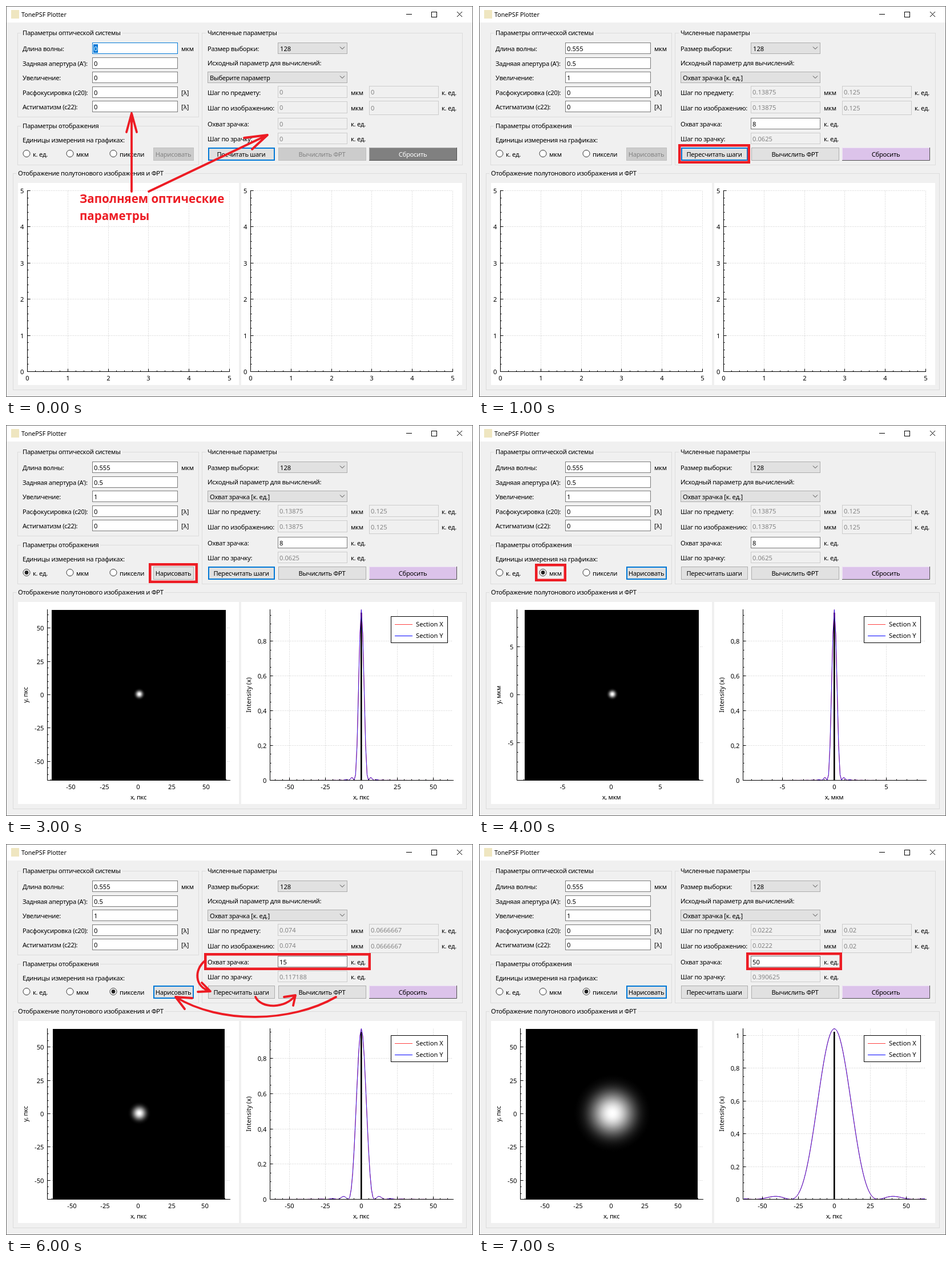
An HTML page with a canvas for the animation above (8000 ms loop, 818 by 685 pixels).

```html
<!DOCTYPE html>
<html lang="ru">
<head>
<meta charset="utf-8">
<title>TonePSF Plotter</title>
<style>
html, body { margin: 0; width: 100%; height: 100%; overflow: hidden; background: #f0f0f0; }
canvas { display: block; }
</style>
</head>
<body>
<canvas id="stage" width="818" height="685"></canvas>
<script>
const ctx = document.getElementById("stage").getContext("2d");
const RED = "#ed1c24", BLUE = "#0078d7", UI = '"Noto Sans", "Open Sans", sans-serif';

function setFont(str, size = 11.2) {
  ctx.font = `${size}px ${UI}`;
  ctx.letterSpacing = /[а-я]/i.test(str) ? "-0.3px" : "0px";
}

function text(str, x, y, { color = "#000", align = "left", size } = {}) {
  setFont(str, size);
  ctx.textAlign = align;
  ctx.textBaseline = "alphabetic";
  ctx.fillStyle = color;
  ctx.fillText(str, x, y + 4);
}

function box(x0, y0, x1, y1, fill, stroke, width = 1) {
  if (fill) {
    ctx.fillStyle = fill;
    ctx.fillRect(x0, y0, x1 - x0 + 1, y1 - y0 + 1);
  }
  if (stroke) {
    ctx.strokeStyle = stroke;
    ctx.lineWidth = width;
    const h = width / 2;
    ctx.strokeRect(x0 + h, y0 + h, x1 - x0 + 1 - width, y1 - y0 + 1 - width);
  }
}

function line(points, color = "#000", width = 1) {
  ctx.strokeStyle = color;
  ctx.lineWidth = width;
  ctx.beginPath();
  points.forEach(([x, y]) => ctx.lineTo(x, y));
  ctx.stroke();
}

function group(title, x0, y0, x1, y1, textX) {
  box(x0, y0, x1, y1, null, "#dcdcdc");
  setFont(title);
  ctx.fillStyle = "#f0f0f0";
  ctx.fillRect(textX - 3, y0 - 1, ctx.measureText(title).width + 6, 3);
  text(title, textX, y0);
}

function field(value, x0, y0, x1, y1, { disabled = false, focus = false } = {}) {
  box(x0, y0, x1, y1, disabled ? "#f0f0f0" : "#fff", disabled ? "#cccccc" : focus ? BLUE : "#7a7a7a");
  const mid = (y0 + y1) / 2 + 1;
  if (focus) box(x0 + 2, y0 + 3, x0 + 9, y1 - 2, BLUE);
  text(value, x0 + 3, mid, { color: disabled ? "#838383" : focus ? "#fff" : "#000" });
}

function combo(value, x0, y0, x1, y1) {
  box(x0, y0, x1, y1, "#e1e1e1", "#adadad");
  text(value, x0 + 4, (y0 + y1) / 2 + 1);
  const x = x1 - 8, y = (y0 + y1) / 2;
  line([[x - 4, y - 2], [x, y + 2], [x + 4, y - 2]], "#444");
}

function button(label, x0, x1, { disabled = false, focus = false } = {}) {
  box(x0, 248, x1, 270, disabled ? "#cccccc" : "#e1e1e1",
    disabled ? "#bfbfbf" : focus ? BLUE : "#adadad", focus ? 2 : 1);
  text(label, (x0 + x1) / 2, 260, { align: "center", color: disabled ? "#838383" : "#000" });
}

function resetButton(active) {
  box(636, 248, 789, 270, active ? "#dcc3ea" : "#808080");
  line([[636.5, 270], [636.5, 248.5], [789, 248.5]], active ? "#eee0f5" : "#a8a8a8");
  line([[636, 270.5], [789.5, 270.5], [789.5, 248]], "#505050");
  text("Сбросить", 712.5, 260, { align: "center", color: active ? "#000" : "#fff" });
}

function radio(label, x, on) {
  ctx.lineWidth = 1;
  ctx.strokeStyle = "#333";
  ctx.fillStyle = "#fff";
  ctx.beginPath();
  ctx.arc(x, 258.5, 6, 0, 7);
  ctx.fill();
  ctx.stroke();
  if (on) {
    ctx.fillStyle = "#222";
    ctx.beginPath();
    ctx.arc(x, 258.5, 3.4, 0, 7);
    ctx.fill();
  }
  text(label, x + 11, 260);
}

// Each axis: pixel span, pixel of zero, pixels per unit, tick step, subdivisions.
function ticks({ from, to, zero, scale, step, sub }, visit) {
  const lo = Math.min(from, to) - 0.6, hi = Math.max(from, to) + 0.6;
  for (let i = -100; i <= 100; i++) {
    const pos = zero + i * step / sub * scale;
    if (pos >= lo && pos <= hi) visit(Math.round(pos) + 0.5, i % sub === 0, i / sub * step);
  }
}

const format = v => String(+v.toFixed(2)).replace(".", ",");

function grid(ax, ay) {
  ctx.setLineDash([1, 2]);
  ticks(ax, (x, major) => major && line([[x, ay.from], [x, ay.to]], "#c4c4c4"));
  ticks(ay, (y, major) => major && line([[ax.from, y], [ax.to, y]], "#c4c4c4"));
  ctx.setLineDash([]);
}

function axes(ax, ay) {
  const left = ax.from + 0.5, bottom = ay.from + 0.5;
  line([[left, ay.to], [left, bottom], [ax.to + 1, bottom]]);
  ticks(ax, (x, major, v) => {
    line([[x, bottom], [x, bottom - (major ? 5 : 2)]]);
    if (major) text(format(v), x, bottom + 11, { align: "center" });
  });
  ticks(ay, (y, major, v) => {
    line([[left, y], [left + (major ? 5 : 2), y]]);
    if (major) text(format(v), left - 6, y, { align: "right" });
  });
}

function vertical(str, x, y) {
  ctx.save();
  ctx.translate(x, y);
  ctx.rotate(-Math.PI / 2);
  text(str, 0, 0, { align: "center" });
  ctx.restore();
}

function besselJ1(v) {
  let sum = 0;
  const n = 60;
  for (let i = 0; i < n; i++) {
    const t = (i + 0.5) / n * Math.PI;
    sum += Math.cos(t - v * Math.sin(t));
  }
  return sum / n;
}

function airy(r) {
  const v = 2 * Math.PI * Math.abs(r);
  return v < 1e-6 ? 1 : (2 * besselJ1(v) / v) ** 2;
}

function emptyPlots() {
  for (const x of [37, 428]) {
    const ax = { from: x, to: x + 354, zero: x, scale: 70.8, step: 1, sub: 5 };
    const ay = { from: 640, to: 323, zero: 640, scale: -63.4, step: 1, sub: 5 };
    grid(ax, ay);
    axes(ax, ay);
  }
}

function spotPlot({ pitch, image, micron }) {
  const [x0, x1] = image;
  const unit = micron ? 0.13875 : 1;
  const perPixel = (x1 - x0) / 129;
  const step = micron ? 5 : 25;
  const ax = { from: micron ? 66 : 72, to: 392, zero: 231.3, scale: perPixel / unit, step, sub: 5 };
  const ay = { from: 622, to: 323, zero: 472, scale: -2.336 / unit, step, sub: 5 };
  grid(ax, ay);
  box(x0, 324, x1 - 1, 621, "#000");
  const radius = 0.61 / pitch * perPixel;
  const glow = ctx.createRadialGradient(233.5, 471.5, 0, 233.5, 471.5, radius);
  for (let i = 0; i <= 24; i++) {
    const level = Math.round(255 * airy(0.61 * i / 24));
    glow.addColorStop(i / 24, `rgb(${level},${level},${level})`);
  }
  ctx.fillStyle = glow;
  ctx.beginPath();
  ctx.arc(233.5, 471.5, radius, 0, 7);
  ctx.fill();
  axes(ax, ay);
  const name = micron ? "мкм" : "пкс";
  text("x, " + name, 232, 652, { align: "center" });
  vertical("y, " + name, 34, 473);
}

function sectionPlot({ pitch, peak, micron }) {
  const unit = micron ? 0.13875 : 1;
  const ax = { from: 462, to: 783, zero: 622, scale: 2.515 / unit, step: micron ? 5 : 25, sub: 5 };
  const ay = { from: 622, to: 323, zero: 622, scale: -299 / peak, step: 0.2, sub: 4 };
  grid(ax, ay);
  line([[622.3, 329], [622.3, 622]], "#000", 2.6);
  const curve = [];
  for (let i = -63; i <= 63; i++) curve.push([622.4 + i * 2.515, 622.5 - 299 * airy(i * pitch)]);
  line(curve, "#ff3030");
  line(curve, "rgba(20,10,255,.85)");
  axes(ax, ay);
  text("x, " + (micron ? "мкм" : "пкс"), 622, 652, { align: "center" });
  vertical("Intensity (x)", 425, 473);
  box(674, 335, 773, 381, "#fff", "#000");
  line([[681, 349.5], [712, 349.5]], "#ff4040");
  line([[681, 369.5], [712, 369.5]], "#0000ff");
  text("Section X", 718, 349);
  text("Section Y", 718, 368.5);
}

function windowFrame() {
  box(0, 0, 817, 684, "#f0f0f0");
  box(0, 0, 817, 28, "#fff");
  box(0, 0, 817, 684, null, "#6a6a6a");
  box(9, 7, 22, 21, "#efe6c0");
  text("TonePSF Plotter", 27, 15, { size: 10.7 });
  line([[701, 14.5], [711, 14.5]]);
  box(745, 10, 754, 19, null, "#000");
  line([[790, 10], [799, 19]]);
  line([[799, 10], [790, 19]]);
}

function form(s) {
  group("Параметры оптической системы", 20, 47, 337, 194, 29);
  group("Параметры отображения", 20, 210, 337, 278, 29);
  group("Численные параметры", 343, 47, 799, 278, 353);
  group("Отображение полутонового изображения и ФРТ", 12, 293, 806, 672, 21);

  const labels = ["Длина волны:", "Задняая апертура (A'):", "Увеличение:", "Расфокусировка (с20):", "Астигматизм (с22):"];
  labels.forEach((label, i) => {
    const y = Math.round(64 + i * 25.6);
    text(label, 29, y + 11);
    field(s.optics[i], 151, y, 300, y + 19, { focus: s.focus === "wave" && i === 0 });
    if (i !== 1 && i !== 2) text(i ? "[λ]" : "мкм", 307, y + 11);
  });

  text("Единицы измерения на графиках:", 29, 235);
  ["к. ед.", "мкм", "пиксели"].forEach((name, i) => radio(name, 36 + 76 * i, s.units === i));
  button("Нарисовать", 258, 328, { disabled: !s.canDraw, focus: s.focus === "draw" });

  text("Размер выборки:", 353, 75);
  combo("128", 476, 64, 597, 83);
  text("Исходный параметр для вычислений:", 353, 100);
  combo(s.source, 353, 115, 597, 134);

  const off = { disabled: true };
  [["Шаг по предмету:", 140], ["Шаг по изображению:", 167]].forEach(([label, y], i) => {
    text(label, 353, y + 11.5);
    field(s.step, 476, y, 597, y + 20, off);
    text("мкм", 604, y + 11.5);
    field(s.canon, 636, y - i, 757, y + 20 + i * 3, off);
    text("к. ед.", 763, y + 11.5);
  });
  text("Охват зрачка:", 353, 207);
  field(s.pupil, 476, 196, 597, 215, { disabled: !s.ready });
  text("к. ед.", 604, 207);
  text("Шаг по зрачку:", 353, 233);
  field(s.pupilStep, 476, 222, 597, 241, off);
  text("к. ед.", 604, 233);

  button(s.ready ? "Пересчитать шаги" : "Посчитать шаги", 354, 470, { focus: s.focus === "steps" || !s.ready });
  button("Вычислить ФРТ", 477, 630, { disabled: !s.ready, focus: s.focus === "psf" });
  resetButton(s.ready);
}

function arrow(start, control, end, wingA, wingB) {
  ctx.strokeStyle = RED;
  ctx.lineWidth = 3.8;
  ctx.lineCap = ctx.lineJoin = "round";
  ctx.beginPath();
  ctx.moveTo(...start);
  ctx.bezierCurveTo(...control, ...end);
  ctx.moveTo(...wingA);
  ctx.lineTo(...end);
  ctx.lineTo(...wingB);
  ctx.stroke();
  ctx.lineCap = "butt";
  ctx.lineJoin = "miter";
}

function introNotes() {
  arrow([220, 325], [220, 280, 220, 230], [220, 188], [211, 221], [229, 221]);
  arrow([250, 325], [320, 292, 390, 259], [458, 226], [417, 231], [431, 251]);
  ctx.font = 'bold 20.5px "Open Sans", sans-serif';
  ctx.letterSpacing = "0px";
  ctx.textAlign = "left";
  ctx.fillStyle = RED;
  ctx.fillText("Заполняем оптические", 129, 345);
  ctx.fillText("параметры", 129, 375);
}

function repeatNotes() {
  arrow([348, 205], [330, 220, 329, 250], [358, 258], [336, 259], [343, 243]);
  arrow([437, 268], [447, 289, 490, 289], [507, 265], [487, 268], [503, 283]);
  arrow([578, 268], [500, 313, 375, 316], [297, 268], [326, 270], [313, 289]);
}

const start = {
  optics: ["0", "0", "0", "0", "0"], source: "Выберите параметр", step: "0", canon: "0",
  pupil: "0", pupilStep: "0", units: -1, focus: "wave", notes: introNotes
};
const filled = {
  optics: ["0.555", "0.5", "1", "0", "0"], source: "Охват зрачка [к. ед.]", step: "0.13875", canon: "0.125",
  pupil: "8", pupilStep: "0.0625", units: -1, ready: true, focus: "steps", mark: [349, 242, 474, 275]
};
const computed = { ...filled, canDraw: true, focus: "psf", mark: [471, 241, 635, 276] };
const narrow = { pitch: 0.125, peak: 0.982, image: [80, 385] };
const drawn = { ...computed, units: 0, focus: "steps", mark: [250, 242, 335, 276], plot: narrow };
const inMicrons = { ...drawn, units: 1, focus: "draw", mark: [98, 243, 152, 273], plot: { ...narrow, micron: true } };
const inPixels = { ...drawn, units: 2, focus: "draw", mark: [173, 243, 250, 273] };
const wider = {
  ...inPixels, step: "0.074", canon: "0.0666667", pupil: "15", pupilStep: "0.117188",
  mark: [347, 191, 638, 220], notes: repeatNotes, plot: { pitch: 1 / 15, peak: 0.97, image: [82, 383] }
};
const widest = {
  ...inPixels, step: "0.0222", canon: "0.02", pupil: "50", pupilStep: "0.390625",
  mark: [468, 190, 635, 220], plot: { pitch: 0.02, peak: 1.042, image: [82, 383] }
};
const scenes = [start, filled, computed, drawn, inMicrons, inPixels, wider, widest];

function render(scene) {
  windowFrame();
  form(scene);
  box(21, 310, 407, 663, "#fff");
  box(412, 310, 798, 663, "#fff");
  if (scene.plot) {
    spotPlot(scene.plot);
    sectionPlot(scene.plot);
  } else emptyPlots();
  if (scene.mark) box(...scene.mark, null, RED, 4.5);
  if (scene.notes) scene.notes();
}

let shown = -1;
function tick() {
  const index = Math.floor(performance.now() / 1000) % scenes.length;
  if (index !== shown) render(scenes[shown = index]);
  requestAnimationFrame(tick);
}
tick();
</script>
</body>
</html>
```
